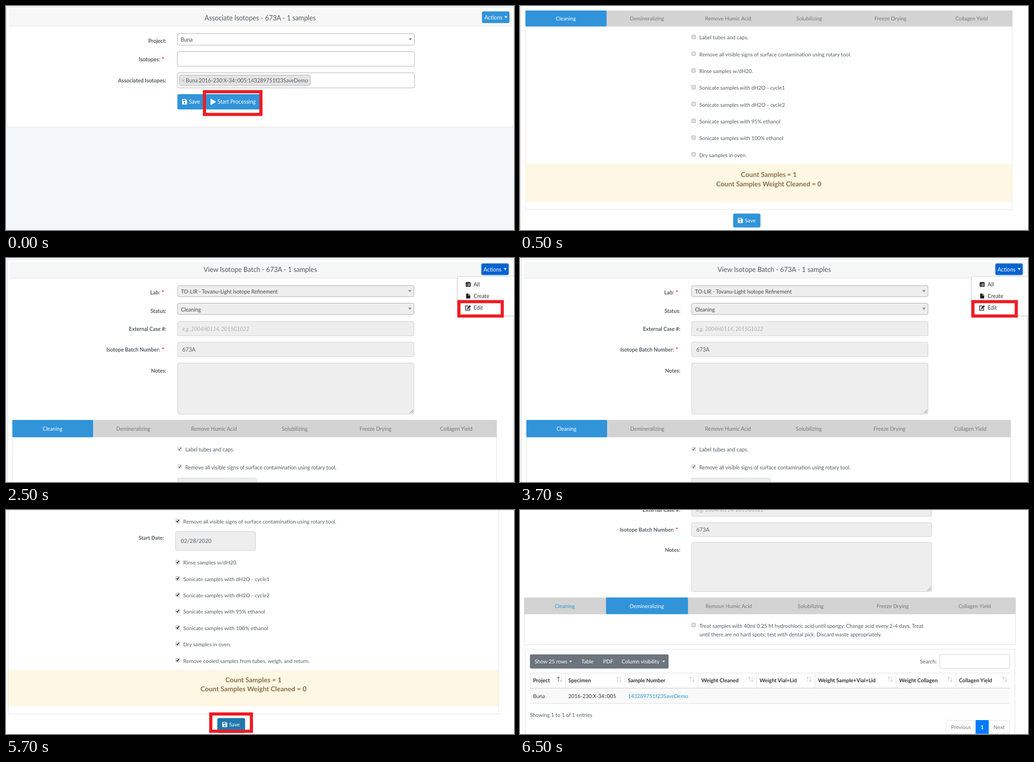
Recreate the animation shown at these times as an HTML page. Size 1125x498 px, loop 8000 ms.

```html
<!DOCTYPE html>
<html lang="en">
<head>
<meta charset="utf-8">
<title>Isotope batch walkthrough</title>
<style>
  html, body { margin: 0; width: 100%; height: 100%; overflow: hidden; background: #fff; }
  svg { display: block; width: 1125px; height: 498px; }
  text { font-family: Lato, "Open Sans", sans-serif; text-rendering: geometricPrecision; }
</style>
</head>
<body>
<svg id="stage" viewBox="0 0 1125 498" xmlns="http://www.w3.org/2000/svg"></svg>
<script>
const BLUE = '#3194d9', RED = '#ee1c24', GREY = '#eee', LINE = '#ddd', INK = '#555b60';
const TABS = ['Cleaning', 'Demineralizing', 'Remove Humic Acid', 'Solubilizing', 'Freeze Drying', 'Collagen Yield'];
const RINSE = [
  'Rinse samples w/dH20.',
  'Sonicate samples with dH2O - cycle1',
  'Sonicate samples with dH2O - cycle2',
  'Sonicate samples with 95% ethanol',
  'Sonicate samples with 100% ethanol',
  'Dry samples in oven.'
];
const LABEL = 'Label tubes and caps.';
const REMOVE = 'Remove all visible signs of surface contamination using rotary tool.';

// Shapes take their left, top, right and bottom edges.
const box = (l, t, r, b, fill, stroke = 'none', rx = 0, sw = 1) =>
  `<rect x="${l}" y="${t}" width="${r - l}" height="${b - t}" rx="${rx}" fill="${fill}" stroke="${stroke}" stroke-width="${sw}"/>`;
const line = (x1, y1, x2, y2, c = LINE, w = 1) =>
  `<path d="M${x1} ${y1}L${x2} ${y2}" stroke="${c}" stroke-width="${w}"/>`;
const shape = (d, fill) => `<path d="${d}" fill="${fill}"/>`;
const stroke = (d, c, w) => `<path d="${d}" fill="none" stroke="${c}" stroke-width="${w}"/>`;
const caret = (x, y, c, w = 3.5) => shape(`M${x - w} ${y}h${2 * w}l${-w} ${w * 1.25}z`, c);
const frame = (l, t, r, b) => box(l + 3.5, t + 3.5, r - 3.5, b - 3.5, 'none', RED, 0, 7);
const field = (l, t, r, b, fill = GREY, edge = '#ccc') => box(l, t, r, b, fill, edge, 3.5);
const select = (l, t, r, b, fill) => field(l, t, r, b, fill, '#aaa') + caret(r - 9, (t + b) / 2 - 2.5, '#888', 3.7);
const grip = (x, y) => stroke(`M${x - 8} ${y}l8 -8M${x - 4} ${y}l4 -4`, '#777', 1);

const disk = (x, y, h) =>
  `<path fill-rule="evenodd" fill="#fff" d="M${x + 1} ${y}h7.5l2.5 2.5v${h - 3.5}q0 1 -1 1h-9q-1 0 -1 -1v${2 - h}q0 -1 1 -1z
   M${x + 1.8} ${y + 1.6}v2.6h5.6v-2.6zM${x + 3.7} ${y + h * .7}a1.8 1.8 0 1 0 3.6 0a1.8 1.8 0 1 0 -3.6 0z"/>`;

function check(x, y, state) {
  const soft = state === 'soft';
  const mark = state ? stroke(`M${x + 2.2} ${y}l2 2.3l3.3 -5`, soft ? '#777' : '#222', 1.7) : '';
  return box(x + .5, y - 4.2, x + 8.7, y + 4.2, state ? '#f1f1f1' : '#e2e2e2', soft ? '#c4c4c4' : '#a9a9a9', 1.5) + mark;
}

// Text tools for one screen: base size and its vertical proportion.
function writer(size, tall) {
  const text = (x, y, s, o = {}) =>
    `<text transform="translate(${x} ${y}) scale(1 ${tall})" font-size="${o.size || size}" fill="${o.fill || INK}"` +
    ` text-anchor="${o.at || 'start'}" font-weight="${o.bold ? 700 : 400}" font-style="${o.italic ? 'italic' : 'normal'}">${s}</text>`;
  const mid = (x, y, s, o) => text(x, y, s, { ...o, at: 'middle' });
  const label = (x, y, s, star) =>
    text(star ? x - 14 : x, y, s, { at: 'end', bold: true }) +
    (star ? text(x - 10, y, '*', { fill: 'red', bold: true }) : '');
  const tabs = (l, t, r, b, active, y) => {
    const w = (r - l) / 6;
    return box(l, t, r, b, '#d3d3d3') +
      box(l + w * active, t, l + w * (active + 1), b, BLUE, 'none', 2) +
      TABS.map((s, i) => mid(l + w * (i + .5) - .5, y, s,
        { fill: i === active ? '#fff' : i < active ? BLUE : '#777' })).join('');
  };
  const item = (x, y, s, state) => check(x, y - 5.6, state) + text(x + 17, y, s);
  const alert = (l, t, r, b, x, y1, y2) =>
    box(l, t, r, b, '#fdf7e3', '#faf0d9') +
    ['Count Samples = 1', 'Count Samples Weight Cleaned = 0'].map((s, i) =>
      mid(x, i ? y2 : y1, s, { size: size * 1.285, bold: true, fill: '#8a6d45' })).join('');
  return { text, mid, label, tabs, item, alert };
}

function associate() {
  const { text, mid, label } = writer(11.65, 1.1), white = { fill: '#fff', size: 12 };
  return box(0, 0, 1125, 498, '#f4f7fa') + box(1.5, 2.5, 1124, 269, '#fff', LINE, 2) +
    box(6, 8, 1120, 44, '#f7f7f7') + line(6, 44.5, 1120, 44.5) +
    mid(563, 31.5, 'Associate Isotopes - 673A - 1 samples', { size: 14.8 }) +
    box(1054, 12, 1115, 38, BLUE, 'none', 3.5) +
    text(1059.5, 30.3, 'Actions', white) + caret(1107, 22.5, '#fff') +
    label(355, 82, 'Project:') + label(355, 123, 'Isotopes:', true) + label(354.5, 170, 'Associated Isotopes:') +
    select(379.5, 61.5, 904.5, 87, '#fff') + text(387, 79.2, 'Buna', { fill: '#444' }) +
    field(379.5, 101.5, 904.5, 134, '#fff', '#aaa') + field(379.5, 148.5, 904.5, 182, '#fff', '#aaa') +
    box(384.5, 153.5, 674, 176.5, '#e4e4e4', '#aaa', 3.5) + text(389, 169.5, '×', { fill: '#999' }) +
    text(398, 170, 'Buna:2016-230:X-34::005:143289751f23SaveDemo') +
    box(379.5, 196, 440, 230, BLUE, 'none', 3.5) + disk(390, 207, 12) + text(405, 217.3, 'Save', white) +
    box(439, 190, 565, 241, '#fff') + box(442, 196, 563, 230, BLUE, 'none', 3.5) +
    shape('M453 206.5q0 -1 1 -.5l10.3 6.2q1 .8 0 1.6l-10.3 6.2q-1 .5 -1 -.5z', '#fff') +
    text(468.5, 217.3, 'Start Processing', white) + frame(436, 187, 568, 244.5);
}

function cleaning() {
  const { text, tabs, item, alert } = writer(11.62, 1);
  return box(0, 0, 1125, 498, '#fff') + line(1, 0, 1, 498, LINE, 1.5) +
    box(12.5, 45, 1090, 453, '#fff', '#e2e2e2') + tabs(12, 10, 1090.5, 45.5, 0, 31.8) +
    [LABEL, REMOVE, ...RINSE].map((s, i) => item(380, 74.4 + 37.3 * i, s)).join('') +
    alert(12.5, 353, 1090, 434.5, 551, 380, 400.8) +
    box(472, 461.5, 532.5, 492.5, BLUE, 'none', 3.5) + disk(482.5, 471.5, 11) +
    text(498, 481.2, 'Save', { fill: '#fff' });
}

function viewBatch() {
  const { text, mid, label, tabs, item } = writer(11.57, 1.08), dark = { fill: '#444' };
  const menu = ['All', 'Create', 'Edit'].map((s, i) =>
    text(1035.5, 63 + 26.2 * i, s, { fill: '#33383d', size: 12 })).join('');
  const icons =
    box(1018, 53.5, 1029, 64, '#222', 'none', 1.5) +
    stroke('M1020 57h1.5M1023 57h4.5M1020 59.2h1.5M1023 59.2h4.5M1020 61.4h1.5M1023 61.4h4.5', '#fff', 1.1) +
    shape('M1019 79h5v4h4v7h-9zM1025 79l3 3h-3z', '#222') +
    stroke('M1024 106.5h-6v9.5h9v-4.5', '#222', 1.5) +
    shape('M1021 113.5l.5 -3l5.5 -5.5l2.5 2.5l-5.5 5.5z', '#222');
  return box(0, 0, 1125, 498, '#f4f7fa') + box(3.5, 3.5, 1123.5, 510, '#fff', LINE) +
    box(8, 9, 1119, 44, '#f7f7f7') + line(8, 44.5, 1119, 44.5) +
    mid(563, 31.3, 'View Isotope Batch - 673A - 1 samples', { size: 14.77 }) +
    box(1051.5, 11, 1114.5, 39, '#a8cbf0', 'none', 5) + box(1053, 12.5, 1113, 37.5, '#0763d0', 'none', 3) +
    text(1057.5, 30.3, 'Actions', { fill: '#fff', size: 12 }) + caret(1105.5, 22.5, '#fff') +
    label(355, 81, 'Lab:', true) + label(355, 121.5, 'Status:') + label(355, 162, 'External Case #:') +
    label(355, 208, 'Isotope Batch Number:', true) + label(355, 254.5, 'Notes:') +
    select(380, 61.5, 903.5, 86, GREY) + text(387.5, 78.5, 'TO-LIR - Tovanu-Light Isotope Refinement', dark) +
    select(380, 100.5, 903.5, 125.5, GREY) + text(387.5, 119, 'Cleaning', dark) +
    field(380, 141, 903.5, 173) + text(390.5, 161.8, 'e.g. 2004H0114, 2015G1022', { italic: true, fill: '#aaa' }) +
    field(380, 187, 903.5, 219.5) + text(390.5, 208, '673A', { size: 12.1 }) +
    field(380, 233.5, 903.5, 347) + grip(902, 345) +
    line(14.5, 398, 14.5, 498) + line(1086.5, 398, 1086.5, 498) + tabs(14, 360, 1087, 398.5, 0, 384.3) +
    item(380, 430, LABEL, 'soft') + item(380, 469.5, REMOVE, 'soft') + field(380, 489.5, 554.5, 510) +
    box(998, 42, 1130, 131, '#f0f0f0', 'none', 5) + box(999.5, 41, 1130, 128, '#fff', '#ccc', 3) +
    menu + icons + frame(999.5, 93.5, 1102.5, 132.5);
}

function finished() {
  const { text, label, item, alert } = writer(11.71, .98);
  return box(0, 0, 1125, 498, '#fff') + line(0, .5, 1125, .5) +
    stroke('M4.5 0V453.5H1091.5V0', '#dedede', 1) +
    item(375.5, 30, REMOVE, 'on') + label(350, 66.2, 'Start Date:') +
    field(375.5, 48, 552.5, 90) + text(387, 72.7, '02/28/2020', { size: 12.3 }) +
    [...RINSE, 'Remove cooled samples from tubes, weigh, and return.'].map((s, i) =>
      item(375.5, 121.4 + 36.35 * i, s, 'on')).join('') +
    alert(5, 356.5, 1091, 435, 548, 382.8, 402.7) +
    box(468, 462.5, 529.5, 496, '#2078ad', 'none', 3.5) + disk(479, 471.5, 11) +
    text(494, 481.3, 'Save', { fill: '#fff' }) + frame(450, 450, 547, 495.5);
}

function demineralizing() {
  const { text, mid, label, tabs } = writer(11.67, 1.02), white = { fill: '#fff' }, dark = { fill: '#333' };
  const heads = [
    [29, 88, 'Project'], [107, 219, 'Specimen'], [239, 381, 'Sample Number'], [401.5, 511, 'Weight Cleaned'],
    [530.5, 640, 'Weight Vial+Lid'], [660, 820, 'Weight Sample+Vial+Lid'], [839.5, 952, 'Weight Collagen'],
    [972, 1073, 'Collagen Yield']
  ];
  const arrows = (x, i) =>
    stroke(`M${x - 3} 381.5v-10M${x - 5.2} 373.8l2.2 -2.5l2.2 2.5`, i ? '#ccc' : '#555', 1.1) +
    stroke(`M${x + 3} 371.5v10M${x + .8} 379.2l2.2 2.5l2.2 -2.5`, '#ccc', 1.1);
  const table = box(22, 396, 1084.5, 430, '#f9f9f9') + line(22, 362.5, 1084.5, 362.5) +
    line(22, 396, 1084.5, 396, '#d5d5d5', 1.5) + line(22, 430.5, 1084.5, 430.5) +
    heads.map(([x, a, s], i) => line(x - 6.5, 362, x - 6.5, 396) +
      text(x, 383, s, { bold: true, fill: '#333' }) + arrows(a, i)).join('') +
    text(29, 417.5, 'Buna', dark) + text(107, 417.5, '2016-230:X-34::005', dark) +
    text(239, 417.5, '143289751f23SaveDemo', { fill: '#2494d5' });
  const pages = box(943.5, 467.5, 1084.5, 497, '#fff', LINE, 3) + box(1009, 467, 1038, 497.5, '#007bff') +
    mid(976.5, 486.5, 'Previous', { fill: '#777' }) + mid(1023.5, 486.5, '1', { fill: '#fff', bold: true }) +
    mid(1061, 486.5, 'Next', { fill: '#777' });
  return box(0, 0, 1125, 498, '#fff') +
    label(355, 3.5, 'External Case #:') + label(355, 48, 'Isotope Batch Number:', true) + label(355, 92.5, 'Notes:') +
    field(380, -18, 911.5, 14) + text(390.5, 3.5, 'e.g. 2004H0114, 2015G1022', { italic: true, fill: '#aaa' }) +
    field(380, 28, 911.5, 59) + text(390.5, 47.8, '673A', { size: 12.1 }) +
    field(380, 72, 911.5, 181.5) + grip(910, 179.5) +
    box(9.5, 231, 1097.5, 299.5, '#fff', '#e0e0e0') + tabs(9, 194.5, 1098, 231.5, 1, 217.5) +
    check(380, 255.5) +
    text(397.5, 262, 'Treat samples with 40ml 0.25 M hydrochloric acid until spongy. Change acid every 2-4 days. Treat') +
    text(397.5, 281, 'until there are no hard spots; test with dental pick. Discard waste appropriately.') +
    box(11.5, 309.5, 1096, 510, '#fff', '#e0e0e0') +
    box(22, 321, 329, 352.5, '#6c757d', 'none', 3.5) +
    text(32.5, 340.5, 'Show 25 rows', white) + caret(112, 335, '#fff', 3) + text(136, 340.5, 'Table', white) +
    text(184, 340.5, 'PDF', white) + text(225, 340.5, 'Column visibility', white) + caret(318, 335, '#fff', 3) +
    text(923, 340.5, 'Search:', { at: 'end' }) + field(929.5, 321, 1084.5, 352, '#fff') +
    table + text(22, 459.5, 'Showing 1 to 1 of 1 entries') + pages;
}

const LOOP = 8000;
const steps = [[0, associate], [500, cleaning], [2500, viewBatch], [4500, finished], [6500, demineralizing]];
const stage = document.getElementById('stage');
stage.innerHTML = steps.map(([, draw]) => `<g visibility="hidden">${draw()}</g>`).join('');
const scenes = [...stage.children];

function show(now) {
  const time = now % LOOP;
  const current = steps.filter(([start]) => time >= start).length - 1;
  scenes.forEach((g, i) => g.setAttribute('visibility', i === current ? 'visible' : 'hidden'));
}

const began = performance.now();
function tick() {
  show(performance.now() - began);
  requestAnimationFrame(tick);
}
tick();
</script>
</body>
</html>
```
